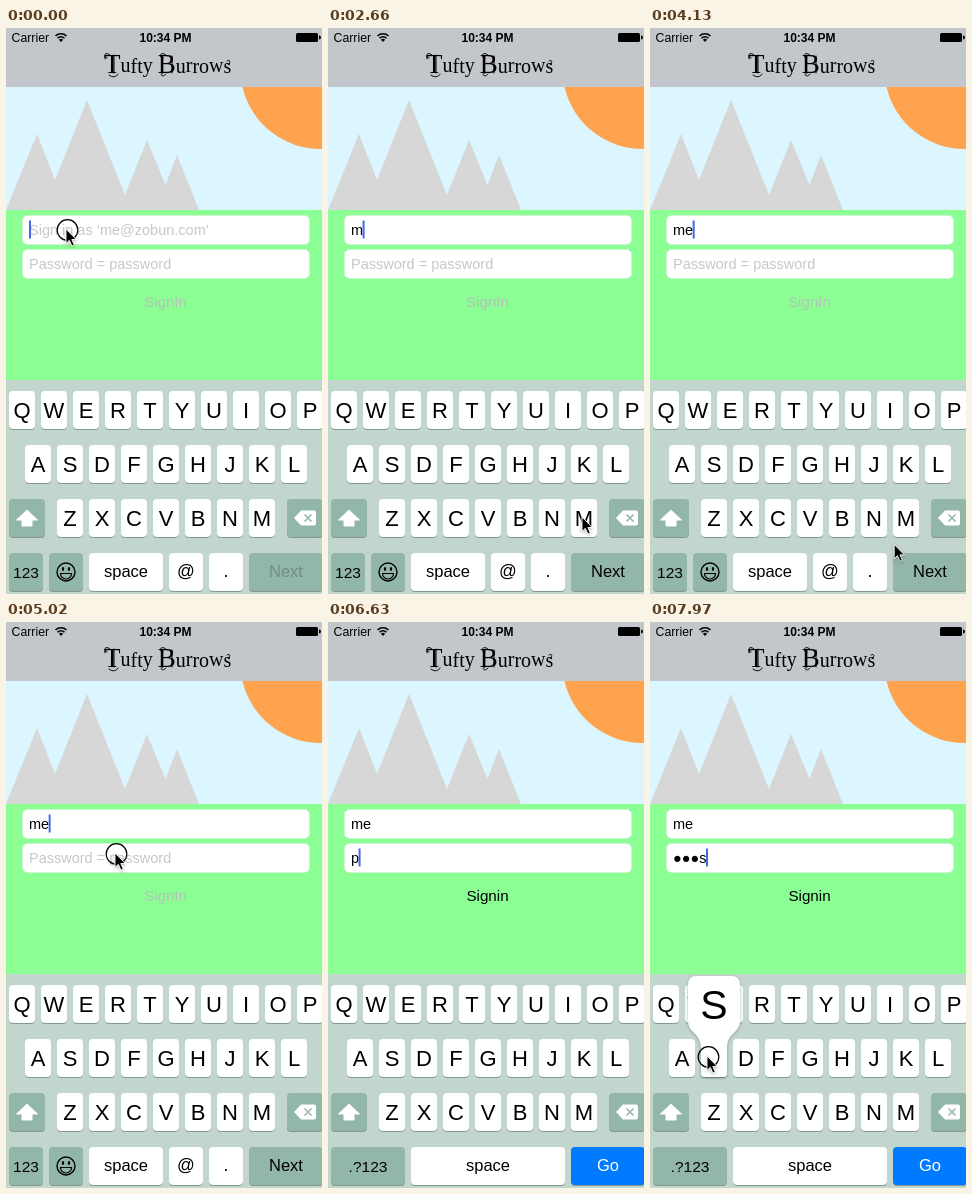
These frames come from a looping animation (316x566 px, 8000 ms). An HTML page:

```html
<!DOCTYPE html>
<html lang="en">
<head>
<meta charset="utf-8">
<title>Sign in</title>
<style>
  html, body { margin: 0; width: 100%; height: 100%; overflow: hidden; }
  svg { display: block; width: 100%; height: 100%; font-family: "Liberation Sans", Arial, sans-serif; }
  text { white-space: pre; }
  .mid { text-anchor: middle; }
  .field { font-size: 14.5px; }
  .hint { fill: #c7c7cc; }
  .title { font-family: "Liberation Serif", serif; font-size: 20px; }
  .title .cap { font-size: 27px; }
  .line { fill: none; stroke: #000; stroke-linecap: round; }
</style>
</head>
<body>
<svg id="stage" viewBox="0 0 316 566" xmlns="http://www.w3.org/2000/svg">
  <defs>
    <filter id="soft" x="-30%" y="-20%" width="160%" height="140%">
      <feDropShadow dx="0" dy="1" stdDeviation="1.5" flood-color="#23392f" flood-opacity=".4"/>
    </filter>
  </defs>

  <rect width="316" height="59" fill="#c3c6cb"/>
  <rect y="59" width="316" height="123" fill="#dbf6ff"/>
  <path d="M0 182L31 106L49 152L81 72L119 167L141 112L159.500 157L171 127L193 182Z" fill="#d7d7d7"/>
  <path d="M236.500 59H316V121A80 80 0 0 1 236.500 59Z" fill="#ffa34f"/>
  <rect y="182" width="316" height="170" fill="#8bff93"/>

  <text x="5.500" y="14" font-size="12.300">Carrier</text>
  <g class="line" stroke-width="1.600" stroke-linecap="butt">
    <path d="M49.500 8A8 8 0 0 1 60.500 8M51.500 10.300A5 5 0 0 1 58.500 10.300" stroke-linecap="butt"/>
    <path d="M55 14L52.900 11.800A3 3 0 0 1 57.100 11.800Z" fill="#000" stroke="none"/>
  </g>
  <text class="mid" x="159.500" y="14" font-size="12" font-weight="bold">10:34 PM</text>
  <rect x="290" y="5" width="22" height="9" rx="1.500"/>
  <path d="M313 7.500A2 2 0 0 1 313 11.500Z"/>

  <text class="title" x="98" y="45" dy="0 -1 1 0 -1 1 0 0 -1 1 0 -1 1"><tspan class="cap">T</tspan>ufty <tspan class="cap">B</tspan>urrows</text>
  <g class="line" stroke-width="1">
    <path d="M104 27C98 22 97 31 101 30M108 27V45M103 47C106 50 111 49 112 46"/>
    <path d="M161 28C154 21 152 31 157 30M166 28V45M160 46C156 51 153 45 157 45"/>
    <path d="M222 37C225 34 224 31 221 33"/>
  </g>

  <g fill="#fff" stroke="#d5ecd6" stroke-width=".7">
    <rect x="16.500" y="187.500" width="287" height="29" rx="5"/>
    <rect x="16.500" y="221.500" width="287" height="29" rx="5"/>
  </g>
  <text id="user" class="field" x="23" y="207"></text>
  <text id="pass" class="field" x="23" y="241"></text>
  <rect id="caret" width="2" height="18" fill="#4669e5"/>
  <text id="sign" class="mid" x="159.500" y="278.500" font-size="15.200"></text>

  <rect y="352" width="316" height="214" fill="#c2d6cd"/>
  <g id="letters"></g>
  <g id="mailKeys"></g>
  <g id="passKeys"></g>

  <g id="popup">
    <path id="bubble" fill="#fff" filter="url(#soft)"/>
    <text id="big" class="mid" font-size="41"></text>
  </g>

  <g id="pointer">
    <circle id="ring" class="line" cx="1.500" cy="1" r="10.300" stroke-width="1.200"/>
    <path d="M0 0V14.500L3.300 11.300L5.900 17L8.300 16L5.800 10.500H10.300Z" stroke="#fff" stroke-width=".9" filter="url(#soft)"/>
  </g>
</svg>
<script>
const LOOP = 8000, STEP = 147.4;
const DARK = '#92b6a8', BLUE = '#007aff', DIM = '#6e9083';
const ROWS = [['QWERTYUIOP', 3, 363], ['ASDFGHJKL', 19, 417], ['ZXCVBNM', 51, 471]];

// Pointer stops: step, x, y
const PATH = [
  [0, 60, 201], [4, 68, 215], [9, 68, 215], [12, 181, 397], [14, 254, 489],
  [18, 254, 489], [22, 83, 378], [25, 83, 378], [29, 274, 542], [33, 109, 231],
  [35, 109, 231], [40, 286, 506], [42, 302, 380], [44, 302, 380],
  [47, 38, 440], [48, 33, 436], [49, 33, 436], [51, 57, 434], [55, 57, 434]
];
const AWAY = [45, 46];

// Letter pop-ups and rings: first step, last step
const PRESSES = [['M', 15, 17], ['E', 22, 25], ['P', 43, 44], ['A', 48, 49], ['S', 51, 52], ['S', 54, 54]];
const RINGS = [[0, 0], [15, 16], [22, 24], [34, 34], [43, 44], [48, 48], [51, 51], [54, 54]];

const USER = [[17, 'm'], [25, 'me']];
const PASS = [[44, 'p'], [49, '●a'], [52, '●●s'], [54, '●●●s']];
const FOCUS = 35;
const RESETS = [0, 17, 25, FOCUS, 44, 49, 52, 54];

const $ = id => document.getElementById(id);
const show = (el, on) => el.setAttribute('display', on ? 'inline' : 'none');
const within = (k, a, b) => k >= a && k <= b;

function add(parent, tag, attrs, text = '') {
  const el = document.createElementNS('http://www.w3.org/2000/svg', tag);
  for (const name in attrs) el.setAttribute(name, attrs[name]);
  el.textContent = text;
  parent.append(el);
  return el;
}

function key(parent, x, y, w, label, size, fill = '#fff', base = 24) {
  add(parent, 'rect', { x, y: y + 1, width: w, height: 38, rx: 4, fill: '#84978e' });
  const face = add(parent, 'rect', { x, y, width: w, height: 38, rx: 4, fill });
  const text = add(parent, 'text', { x: x + w / 2, y: y + base, class: 'mid', 'font-size': size }, label);
  return { face, text };
}

function buildKeys() {
  const top = $('letters'), mail = $('mailKeys'), pass = $('passKeys');
  for (const [row, x, y] of ROWS)
    [...row].forEach((c, i) => key(top, x + 32 * i, y, 26, c, 22, '#fff', 27));

  key(top, 3, 471, 36, '', 1, DARK);
  add(top, 'path', { d: 'M21 482L31.500 492H26V498H16V492H10.500Z', fill: '#fff', stroke: '#fff', 'stroke-linejoin': 'round' });
  key(top, 281, 471, 36, '', 1, DARK);
  add(top, 'path', { d: 'M288 490L295 482.500H308Q310 482.500 310 484.500V495.500Q310 497.500 308 497.500H295Z', fill: '#fff' });
  add(top, 'path', { d: 'M298.500 486.500L305.500 493.500M305.500 486.500L298.500 493.500', stroke: DARK, 'stroke-width': 1.5 });

  key(mail, 3, 525, 34, '123', 15.5, DARK, 25);
  key(mail, 43, 525, 34, '', 1, DARK);
  add(mail, 'circle', { cx: 60, cy: 544, r: 9, class: 'line', 'stroke-width': 1.4 });
  add(mail, 'path', { d: 'M54.500 545.500H65.500A5.500 5.500 0 0 1 54.500 545.500Z', class: 'line', 'stroke-width': 1.2 });
  for (const cx of [57, 63]) add(mail, 'ellipse', { cx, cy: 541, rx: 1.2, ry: 1.9 });
  key(mail, 83, 525, 74, 'space', 16.5);
  key(mail, 163, 525, 34, '@', 17.5);
  key(mail, 203, 525, 34, '.', 17.5);
  const next = key(mail, 243, 525, 74, 'Next', 16.5, DARK);

  key(pass, 3, 525, 74, '.?123', 15.5, DARK, 25);
  key(pass, 83, 525, 154, 'space', 16.5);
  const go = key(pass, 243, 525, 74, 'Go', 16.5, DARK);
  return { next, go };
}

const { next, go } = buildKeys();

const typed = (list, k) => list.reduce((now, [at, s]) => k >= at ? s : now, '');

function pointerAt(k) {
  const i = Math.max(1, PATH.findIndex(p => p[0] >= k));
  const [a, x0, y0] = PATH[i - 1], [b, x1, y1] = PATH[i];
  const u = (k - a) / (b - a), e = u * u * (3 - 2 * u);
  return [x0 + (x1 - x0) * e, y0 + (y1 - y0) * e];
}

function caretOn(k) {
  const age = k - RESETS.filter(r => r <= k).pop();
  return age < 4 || (age - 1) % 6 < 3;
}

function fillField(el, value, hint) {
  el.textContent = value || hint;
  el.setAttribute('class', value ? 'field' : 'field hint');
}

function drawPopup(letter) {
  show($('popup'), letter);
  if (!letter) return;
  const [row, left, y] = ROWS.find(r => r[0].includes(letter));
  const x = left + 32 * row.indexOf(letter);
  const cx = Math.min(x + 13, 291), l = cx - 26, r = cx + 26;
  $('bubble').setAttribute('d',
    `M${l + 9} ${y - 63}H${r - 9}Q${r} ${y - 63} ${r} ${y - 54}V${y - 19}` +
    `C${r} ${y - 5} ${x + 26} ${y - 7} ${x + 26} ${y + 9}V${y + 34}q0 4 -4 4H${x + 4}q-4 0 -4 -4V${y + 9}` +
    `C${x} ${y - 7} ${l} ${y - 5} ${l} ${y - 19}V${y - 54}Q${l} ${y - 63} ${l + 9} ${y - 63}Z`);
  $('big').textContent = letter;
  $('big').setAttribute('x', cx);
  $('big').setAttribute('y', y - 20);
}

function draw(t) {
  const k = Math.floor(t / STEP + 0.1);
  const user = typed(USER, k), pass = typed(PASS, k), onPass = k >= FOCUS;

  fillField($('user'), user, 'Sign in as ‘me@zobun.com’');
  fillField($('pass'), pass, 'Password = password');
  const active = $(onPass ? 'pass' : 'user'), value = onPass ? pass : user;
  $('caret').setAttribute('x', 23 + (value ? active.getComputedTextLength() - 0.5 : 0));
  $('caret').setAttribute('y', onPass ? 226.5 : 192.5);
  show($('caret'), caretOn(k));

  $('sign').textContent = pass ? 'Signin' : 'SignIn';
  $('sign').setAttribute('fill', pass ? '#000' : '#b4c4b8');
  show($('mailKeys'), !onPass);
  show($('passKeys'), onPass);
  next.text.setAttribute('fill', user ? '#000' : DIM);
  go.face.setAttribute('fill', pass ? BLUE : DARK);
  go.text.setAttribute('fill', pass ? '#fff' : DIM);

  const press = PRESSES.find(p => within(k, p[1], p[2]));
  drawPopup(press ? press[0] : '');
  show($('ring'), RINGS.some(r => within(k, ...r)));
  show($('pointer'), !within(k, ...AWAY));
  $('pointer').setAttribute('transform', `translate(${pointerAt(k)})`);
}

function tick(now) {
  draw(now % LOOP);
  requestAnimationFrame(tick);
}
draw(0);
requestAnimationFrame(tick);
</script>
</body>
</html>
```
